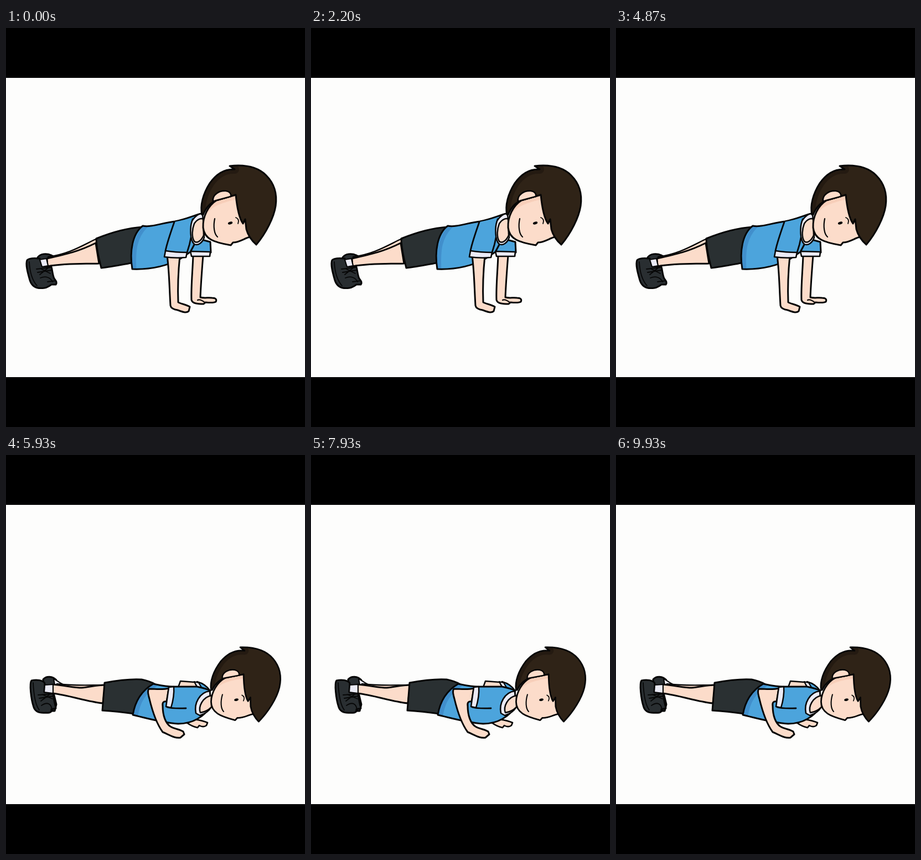
These frames come from a looping animation (540 by 720 pixels, 9990 ms). An HTML page with a canvas:

```html
<!DOCTYPE html>
<html lang="en">
<head>
<meta charset="utf-8">
<title>Push-ups</title>
<style>
  html, body { margin: 0; width: 100%; height: 100%; overflow: hidden; background: #000; }
  canvas { display: block; }
</style>
</head>
<body>
<canvas id="stage" width="540" height="720"></canvas>
<script>
const ctx = document.getElementById('stage').getContext('2d');
const LOOP = 9990, HOLD = 1000;
const INK = '#060606', SKIN = '#fcdcca', SHADE = '#f8cfba', HAIR = '#2f2317', HAIR_SHADE = '#241a11',
      SHORTS = '#2a3032', SHIRT = '#4ca4dc', BLUE = '#418fcc', WHITE = '#ebebf6', SHOE = '#292e31',
      PAPER = '#fdfdfc';

function shape(d, fill, width = 3) {
  const path = new Path2D(d);
  if (fill) { ctx.fillStyle = fill; ctx.fill(path); }
  if (width) { ctx.strokeStyle = INK; ctx.lineWidth = width; ctx.stroke(path); }
}
const line = (d, width = 2.8) => shape(d, null, width);

// Fills a shape, tints a band along a curve inside it, then outlines it.
function shaded(d, fill, band, tint, width) {
  shape(d, fill, 0);
  ctx.save();
  ctx.clip(new Path2D(d));
  ctx.strokeStyle = tint;
  ctx.lineWidth = width;
  ctx.stroke(new Path2D(band));
  ctx.restore();
  line(d, 3);
}

function head() {
  shaded('M415 301L380 311C365 321 355 340 356 360C358 381 376 387 406 392L410 387C421 387 430 380 440 377L447 350Z',
    SKIN, 'M356 341C361 326 372 315 416 305', SHADE, 8);
  shaded('M354 337C350 320 356 299 368 280C380 263 395 254 413 255L404 249C431 246 455 251 470 266C485 281 490 300 487 321C484 341 470 370 452 391C443 383 437 374 434 363L432 345L428 353C421 343 417 322 415 301L380 311C368 316 361 324 356 337Z',
    HAIR, 'M354 337C350 320 356 299 368 280C380 263 395 254 413 255', HAIR_SHADE, 16);
  shape('M374 313C372 301 385 293 397 294C404 295 407 299 406 304L380 311Z', SKIN, 2.6);
  ctx.fillStyle = INK;
  ctx.beginPath();
  ctx.ellipse(405, 352, 4.3, 2.4, -0.3, 0, Math.PI * 2);
  ctx.fill();
  line('M415 342C420 344 421 348 419 353', 1.8);
  line('M377 344C374 358 376 372 382 377', 2.2);
}

function raised() {
  shape('M57 414C62 407 73 406 82 410L88 414L80 430L62 425Z', SHOE);
  shape('M76 413C113 408 135 394 164 380L166 395L80 420Z', SKIN, 2.4);
  shape('M74 416C110 408 132 403 162 388L168 425C140 426 112 424 75 430Z', SKIN);
  shape('M38 419C35 426 39 441 43 455C47 468 58 471 70 469C75 468 78 466 82 463L90 463C93 459 90 456 87 452C84 445 84 438 82 431L66 430L61 416C52 415 42 415 38 419Z', SHOE);
  shape('M61 418L73 416L76 429L65 431Z', WHITE, 2.2);
  line('M42 422C43 440 47 455 56 465M55 435L82 432M57 441L82 437M61 445L76 433M64 435L80 443M62 451C72 447 80 450 84 458M75 458L90 456', 1.8);
  shape('M163 380C190 369 216 361 247 359L234 385L227 424C210 427 190 431 172 433C168 415 163 400 163 380Z', SHORTS);

  shape('M338 410C337 440 334 466 335 491C337 497 345 498 357 498L360 495C370 496 376 496 379 494C381 490 379 487 372 487C365 486 358 488 351 486C352 460 354 435 356 410Z', SKIN);
  line('M346 491C350 489 355 492 360 496', 2.2);
  shape('M346 380L369 386L370 405L332 404L338 390Z', SHIRT);
  shape('M333 403L369 404L368 412L335 412Z', WHITE, 2.6);

  shaded('M247 357C262 360 281 352 305 349C325 345 340 338 352 335L341 389L333 404L314 417C285 432 255 436 228 435C223 404 228 371 247 357Z',
    SHIRT, 'M252 358C233 378 230 400 232 438', BLUE, 7);
  shape('M291 411C295 440 295 470 297 501C298 506 303 508 310 509C318 512 325 515 330 511L332 503C325 499 317 498 311 495C310 470 311 440 314 411Z', SKIN);
  shape('M304 350C297 370 291 387 288 402L327 405C333 388 336 366 337 343Z', SHIRT, 0);
  line('M304 350C297 370 291 387 288 402');
  line('M337 345C337 369 333 388 327 405');
  shape('M288 402L286 413C300 415 314 415 325 414L327 405C315 405 300 404 288 402Z', WHITE, 2.6);
  shape('M336 348C342 339 350 333 355 336L358 378C354 389 346 393 340 390C332 383 332 360 336 348Z', WHITE, 2.5);
  shape('M340 353C346 344 353 343 356 345L357 374C352 385 345 389 340 385C335 377 336 363 340 353Z', SKIN, 2.5);
  head();
}

function lowered() {
  shape('M67 405C73 398 84 399 91 406L85 425L91 450L88 462L74 462Z', SHOE);
  shape('M86 404C90 405 96 411 103 414L88 415Z', WHITE, 2.2);
  shape('M92 413C125 417 153 415 179 415L178 424L92 421Z', SKIN, 2.4);
  shape('M84 414C107 416 124 420 137 420C150 419 164 415 179 415L175 448C146 445 116 434 84 430Z', SKIN);
  shape('M46 407C42 412 45 440 50 455C53 464 62 466 72 465C79 466 83 464 82 459L90 457C88 448 86 440 85 430L69 428L70 412C67 406 55 405 46 407Z', SHOE);
  shape('M70 415L85 414L85 430L69 428Z', WHITE, 2.2);
  line('M49 411C50 430 52 450 60 460M58 433L86 431M60 439L86 435M63 444L80 431M65 432L84 440M64 452C74 445 82 448 83 460', 1.8);
  shape('M178 411C205 406 230 404 245 405C255 407 263 410 270 414L232 467C210 464 190 462 174 461Z', SHORTS);

  shape('M325 482C333 488 341 491 346 492L349 488C354 491 358 491 362 488L364 483C355 479 347 478 340 477Z', SKIN, 2.6);
  shape('M311 419L315 408L341 410L346 421Z', SKIN, 2.5);
  shape('M345 409C356 412 364 418 369 426L350 423Z', SHIRT, 2.5);
  shape('M340 409L348 411L354 421L346 420Z', WHITE, 2.3);
  shaded('M266 413C276 415 287 418 303 418L345 418C355 420 363 422 368 425L370 452C359 472 337 485 311 485C281 483 255 475 229 469C233 445 245 425 266 413Z',
    SHIRT, 'M270 414C249 427 238 445 234 472', BLUE, 8);
  shape('M258 422C270 422 282 424 294 421L290 445C284 444 282 447 283 453C283 470 288 484 297 490C305 495 312 494 320 499L322 504L315 510C305 512 295 505 283 500C272 485 265 465 259 440C256 430 256 424 258 422Z', SKIN);
  shape('M294 419L303 418C304 431 302 443 298 456L289 454Z', WHITE, 2.5);
  line('M291 455C301 458 314 457 325 457');
  shape('M368 426C350 428 339 448 343 466L350 470C359 467 366 463 370 456Z', WHITE, 2.5);
  shape('M371 434C355 437 347 454 351 465C358 464 365 461 371 455Z', SKIN, 2.5);

  ctx.save();
  ctx.translate(423, 347);
  ctx.rotate(0.083);
  ctx.scale(0.922, 0.922);
  ctx.translate(-404, -249);
  head();
  ctx.restore();
}

function draw(time) {
  ctx.fillStyle = '#000';
  ctx.fillRect(0, 0, 540, 720);
  ctx.fillStyle = PAPER;
  ctx.fillRect(0, 90, 540, 540);
  ctx.lineJoin = ctx.lineCap = 'round';
  if (Math.floor((time % LOOP) / HOLD) % 2) lowered();
  else raised();
}

function tick() {
  draw(performance.now());
  requestAnimationFrame(tick);
}
tick();
</script>
</body>
</html>
```
